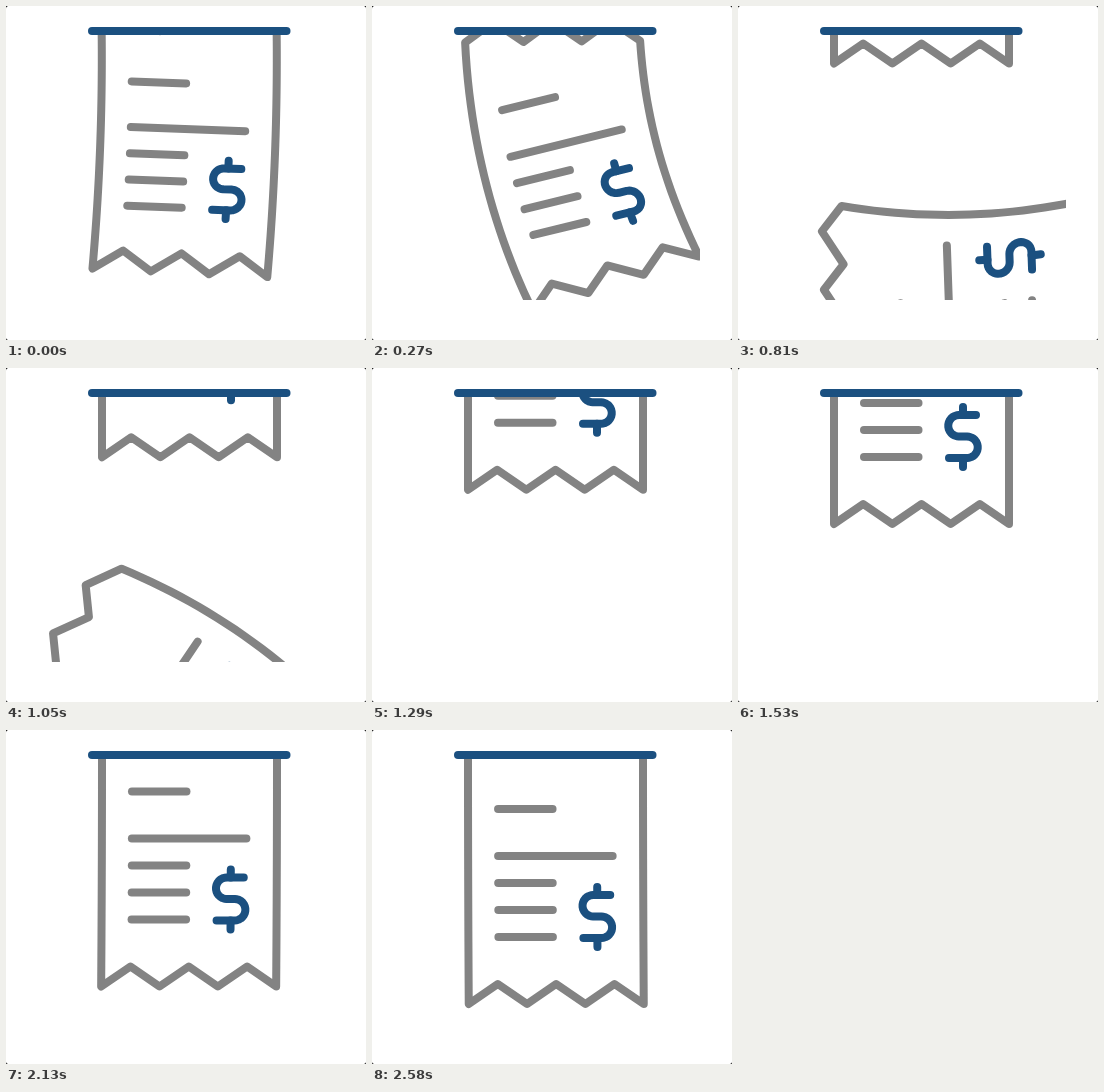
Write an HTML page with a canvas that moves like this. It is 360 by 334 pixels and loops after 2.61 s.

```html
<!DOCTYPE html>
<html lang="en">
<head>
<meta charset="utf-8">
<title>Receipt</title>
<style>
  html, body { margin: 0; width: 100%; height: 100%; overflow: hidden; background: #fff; }
  canvas { display: block; }
</style>
</head>
<body>
<canvas id="stage" width="360" height="334"></canvas>
<script>
const ctx = document.getElementById("stage").getContext("2d");
const LOOP = 2610, STEP = 30, FALL_END = 1300, FEED_START = 560;
const GRAY = "#838383", BLUE = "#1b5080";
const CENTER = 183.5, HALF = 87.5, LENGTH = 249, TOOTH = 20, BAR_Y = 25;

// Key moments of the torn sheet; bow bends its spine, skew turns its upper rows
const FALL = [
  { at: 0, x: 181.5, y: 146, angle: 2.2, bow: -3, skew: -3 },
  { at: 450, x: 212, y: 181, angle: -30.6, bow: 20, skew: 25 },
  { at: 810, x: 235, y: 296, angle: -92, bow: 13, skew: 0 },
  { at: 1050, x: 180, y: 334, angle: -56, bow: -13, skew: 0 },
  { at: FALL_END, x: 110, y: 480, angle: -25, bow: -5, skew: 0 }
];

// Lower edge of the sheet being printed
const FEED = [
  { at: FEED_START, bottom: 24 },
  { at: 1530, bottom: 156 },
  { at: 2160, bottom: 260 },
  { at: 2580, bottom: 274 }
];

// Smooth curve through one property of the keys
function sample(keys, prop, t) {
  const next = keys.findIndex(key => key.at > t);
  if (next < 0) return keys[keys.length - 1][prop];
  if (next === 0) return keys[0][prop];
  const a = keys[next - 1], b = keys[next];
  const span = b.at - a.at, p = (t - a.at) / span, d = b[prop] - a[prop];
  const slope = (from, to) => (to[prop] - from[prop]) / (to.at - from.at) * span;
  const m0 = slope(keys[next - 2] || a, b), m1 = slope(a, keys[next + 1] || b);
  return a[prop] + p * (m0 + p * (3 * d - 2 * m0 - m1 + p * (m0 + m1 - 2 * d)));
}

// Maps sheet coordinates to the stage; rowY picks the row whose angle is used
function fallingMap(t) {
  const get = prop => sample(FALL, prop, t);
  const x0 = get("x"), y0 = get("y"), angle = get("angle"), bow = get("bow"), skew = get("skew");
  const reach = 121 + 7 * Math.min(1, t / 450);
  const rad = Math.PI / 180, cos = Math.cos(angle * rad), sin = Math.sin(angle * rad);
  return (x, y, rowY = y) => {
    const along = 2 * y / LENGTH - 1, side = bow * along * along;
    const row = 1 - Math.min(1, Math.max(0, rowY / LENGTH));
    const turn = (angle + skew * (row * row - 0.2)) * rad;
    return [
      x0 + side * cos - along * reach * sin + x * Math.cos(turn),
      y0 + side * sin + along * reach * cos + x * Math.sin(turn)
    ];
  };
}

function hangingMap(t) {
  const bottom = sample(FEED, "bottom", t);
  const sway = -4 * Math.max(0, (t - 1530) / 1050) * Math.sin(2 * Math.PI * (t - 2095) / 500);
  return (x, y) => {
    const py = bottom - LENGTH + y;
    const depth = Math.max(0, py - BAR_Y) / LENGTH;
    return [CENTER + x + sway * depth * depth, py];
  };
}

function stroke(points, color, closed) {
  ctx.beginPath();
  points.forEach(([x, y]) => ctx.lineTo(x, y));
  if (closed) ctx.closePath();
  ctx.strokeStyle = color;
  ctx.stroke();
}

function outline() {
  const teeth = 6, parts = 24, right = [], left = [], top = [], bottom = [];
  for (let i = 0; i <= teeth; i++) {
    const x = HALF * (2 * i / teeth - 1), rise = i % 2 * TOOTH;
    top.push([x, -rise]);
    bottom.unshift([x, LENGTH - rise]);
  }
  for (let i = 1; i < parts; i++) {
    right.push([HALF, LENGTH * i / parts]);
    left.unshift([-HALF, LENGTH * i / parts]);
  }
  return [...top, ...right, ...bottom, ...left];
}

function dollar(x, top, r) {
  const curve = [[x + 13, top]];
  const arc = (cx, cy, side) => {
    for (let a = 0; a <= 180; a += 12) {
      const rad = a * Math.PI / 180;
      curve.push([cx + side * r * Math.sin(rad), cy - r * Math.cos(rad)]);
    }
  };
  arc(x - 4, top + r, -1);
  arc(x + 4, top + 3 * r, 1);
  const base = top + 4 * r;
  curve.push([x - 14, base]);
  return [curve, [[x, top - 8], [x, top]], [[x, base], [x, base + 9]]];
}

const PAPER = outline();
const SIGN = dollar(41.5, 140, 10.75);
const TOTAL_Y = 101;
const ROWS = [54, TOTAL_Y, ...[1, 2, 3].map(i => TOTAL_Y + 27 * i)]
  .map(y => [[-57.5, y], [y === TOTAL_Y ? 57 : -3, y]]);

function drawReceipt(map) {
  const print = points => points.map(([x, y]) => map(x, y, LENGTH / 2));
  stroke(PAPER.map(([x, y]) => map(x, y)), GRAY, true);
  ROWS.forEach(row => stroke(print(row), GRAY));
  SIGN.forEach(part => stroke(print(part), BLUE));
}

function draw(t) {
  ctx.fillStyle = "#000";
  ctx.fillRect(0, 0, 360, 334);
  ctx.fillStyle = "#fff";
  ctx.beginPath();
  ctx.roundRect(0, 0, 360, 334, 2.5);
  ctx.fill();

  ctx.lineWidth = 8;
  ctx.lineCap = ctx.lineJoin = "round";

  ctx.save();
  ctx.beginPath();
  ctx.rect(38, BAR_Y, 290, 294 - BAR_Y);
  ctx.clip();
  if (t < FALL_END) drawReceipt(fallingMap(t));
  if (t > FEED_START) drawReceipt(hangingMap(t));
  ctx.restore();

  stroke([[86, BAR_Y], [280.5, BAR_Y]], BLUE);
}

const start = performance.now();
function tick() {
  const t = (performance.now() - start) % LOOP;
  draw(Math.floor(t / STEP) * STEP);
  requestAnimationFrame(tick);
}
tick();
</script>
</body>
</html>
```
